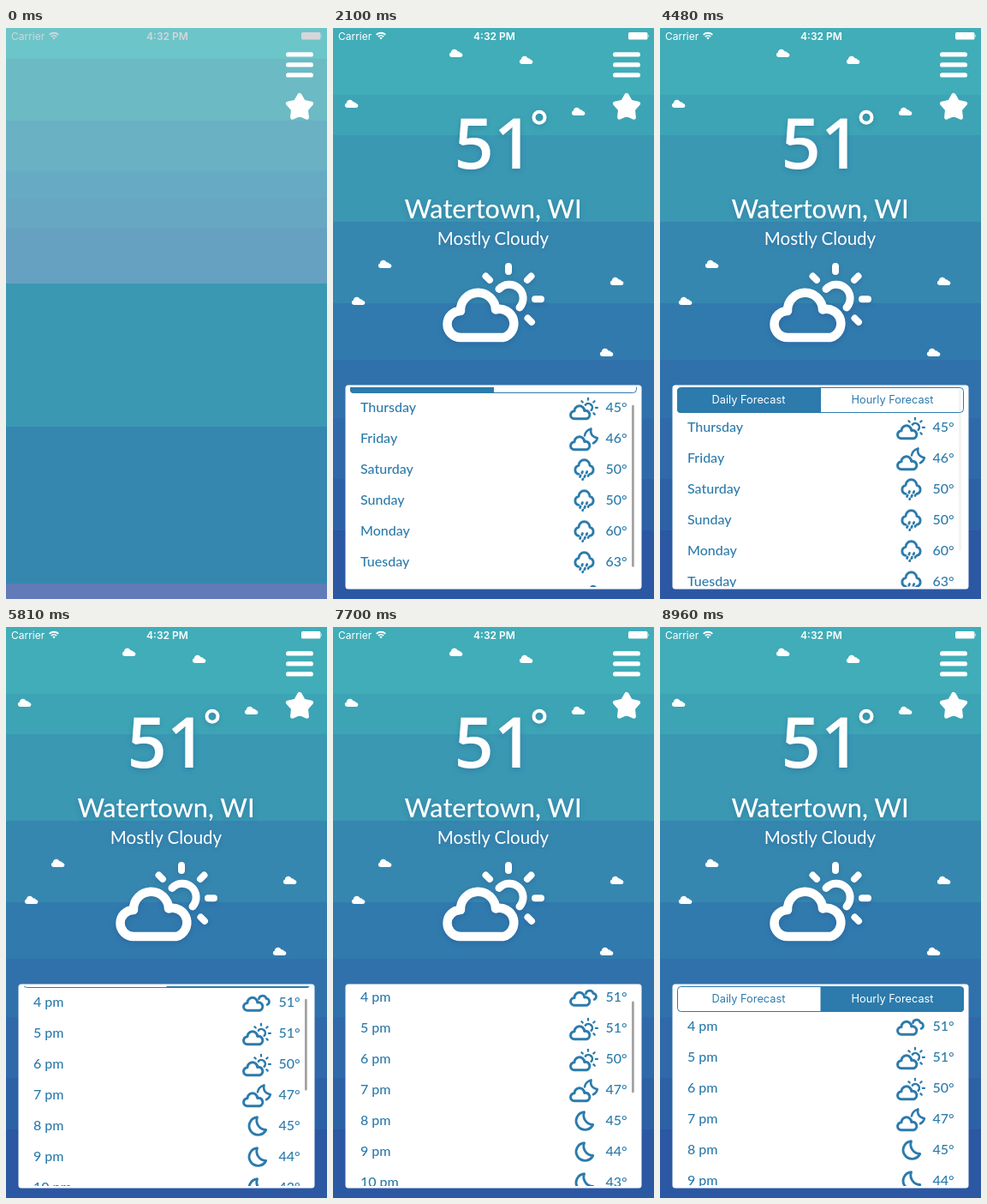
Write an HTML page that moves like this. It is 375 by 666 pixels and loops after 9030 ms.

```html
<!DOCTYPE html>
<html lang="en">
<head>
<meta charset="utf-8">
<title>Weather</title>
<style>
  html, body { margin: 0; width: 100%; height: 100%; overflow: hidden; background: #3a98b3; }
  svg { display: block; width: 375px; height: 666px; }
  .ui { font-family: Inter, Roboto, sans-serif; }
  .copy { font-family: Lato, "Open Sans", sans-serif; }
  .line { fill: none; stroke: currentColor; stroke-linecap: round; stroke-linejoin: round; }
  .shadow { filter: drop-shadow(0 2px 3px rgba(10, 40, 110, .22)); }
  #card { color: #2c7bac; }
  #card text { fill: currentColor; }
  .row text { font-size: 16px; font-weight: 500; }
</style>
</head>
<body>
<svg id="stage" viewBox="0 0 375 666">
  <defs>
    <clipPath id="view"><rect x="20" y="419" width="335" height="233"/></clipPath>
    <path id="puff" d="M-5.5 4a2.8 2.8 0 0 1-.6-5.5A4 4 0 0 1 1.6-2.7 3.4 3.4 0 0 1 5-1.1 2.6 2.6 0 0 1 5.5 4Z"/>
    <path id="cloud" class="line" stroke-width="10.5" d="M149 361A15.5 15.5 0 0 1 149 330A20.5 20.5 0 0 1 190 328.5A16.7 16.7 0 0 1 199 361Z"/>
    <g id="sunny">
      <use href="#cloud"/>
      <path class="line" stroke-width="9" d="M194 304.5A16 16 0 0 1 218 326"/>
      <path class="line" stroke-width="8" d="M205 278V284M178.5 289.5L183 294M231.5 289.5L227 294M236 316.3H243M227.5 338.5L232 343"/>
    </g>
    <g id="night">
      <use href="#cloud"/>
      <path class="line" stroke-width="9" d="M191 304Q194 283 217 276Q210 306 243 314Q238 330 226 335"/>
    </g>
    <g id="cloudy" transform="translate(0 -12)">
      <use href="#cloud"/>
      <path class="line" stroke-width="9.5" d="M196 314A15.5 15.5 0 0 1 226 312A13 13 0 0 1 230 337"/>
    </g>
    <g id="rain">
      <path class="line" stroke-width="2.9" d="M-6.5 5.3A5.1 5.1 0 0 1-6.5-4.7A6.5 6.5 0 0 1 6.5-4.7A5.1 5.1 0 0 1 6.5 5.3"/>
      <path class="line" stroke-width="2.7" d="M-2 2.5l-.7 1.6M3.3 2.5l-.7 1.6M-4.3 7l-.7 1.6M1 7l-.7 1.6M5 6.6l-.4 .9M-1.5 10.8l-.4 .9"/>
    </g>
    <path id="moon" class="line" stroke-width="2.9" d="M0-10.2A10.3 10.3 0 1 0 10.2 4.5A11 11 0 0 1 0-10.2Z"/>
    <path id="wind" class="line" stroke-width="2.8" d="M-14-2.3H10.5A2.8 2.8 0 1 0 8-6.5M-14 2H4.5A3.2 3.2 0 1 1 1.8 7.5"/>
  </defs>

  <g id="sky"></g>
  <g id="haze"></g>

  <g id="status" class="ui">
    <text x="6" y="13.5" font-size="12">Carrier</text>
    <text x="188.5" y="13.5" font-size="12" font-weight="600" text-anchor="middle">4:32 PM</text>
    <path d="M50 7.3a8.6 8.6 0 0 1 12 0l-1.3 1.3a6.7 6.7 0 0 0-9.4 0ZM52.2 9.5a5.4 5.4 0 0 1 7.6 0l-1.3 1.3a3.5 3.5 0 0 0-5 0ZM54.3 11.6a2.4 2.4 0 0 1 3.4 0L56 13.4Z"/>
    <rect x="345" y="5" width="22.5" height="8.5" rx="1.5"/>
    <path d="M368.2 7.5q1.6 1.7 0 3.4Z"/>
  </g>

  <g fill="#fff">
    <rect x="327" y="28.2" width="32" height="5.4" rx="2.7"/>
    <rect x="327" y="40.2" width="32" height="5.4" rx="2.7"/>
    <rect x="327" y="52.2" width="32" height="5.4" rx="2.7"/>
    <polygon id="star" stroke="#fff" stroke-width="5" stroke-linejoin="round"/>
  </g>

  <g id="content" fill="#fff" color="#fff">
    <g id="puffs"></g>
    <g class="shadow">
      <text x="141.5" y="163.5" font-family="'Open Sans', sans-serif" font-size="81" font-weight="600">51</text>
      <circle cx="241" cy="104.3" r="6.5" fill="none" stroke="#fff" stroke-width="4"/>
    </g>
    <g class="copy shadow" text-anchor="middle">
      <text x="187" y="222" font-size="30.5" font-weight="500">Watertown, WI</text>
      <text x="187" y="253" font-size="20.5">Mostly Cloudy</text>
    </g>
    <use href="#sunny" class="shadow"/>
  </g>

  <g id="card">
    <rect x="14.5" y="416.5" width="346" height="238" rx="3.5" fill="#fff"/>
    <g clip-path="url(#view)">
      <g id="scroller">
        <path id="left" d="M188 419.5H24a4 4 0 0 0-4 4V445a4 4 0 0 0 4 4H188Z" fill="currentColor"/>
        <path id="right" d="M187.5 419.5H351a4 4 0 0 1 4 4V445a4 4 0 0 1-4 4H187.5Z" fill="currentColor"/>
        <rect x="20.5" y="419.5" width="334" height="29" rx="4" fill="none" stroke="currentColor"/>
        <g class="ui" font-size="12.8" text-anchor="middle">
          <text id="dailyLabel" x="103.5" y="438">Daily Forecast</text>
          <text id="hourlyLabel" x="271.5" y="438">Hourly Forecast</text>
        </g>
        <g id="daily" class="copy"></g>
        <g id="hourly" class="copy"></g>
      </g>
      <rect id="bar" x="349" width="2.8" rx="1.4" fill="#a3a3a3"/>
    </g>
  </g>
</svg>
<script>
const LOOP = 9030, STEP = 70;
const VIEW = 233, ROW = 36, HEADER = 29;
const $ = id => document.getElementById(id);

// Each band: bottom edge and colour.
const bands = list => {
  let top = 0;
  return list.map(([bottom, color]) => {
    const rect = `<rect y="${top}" width="375" height="${bottom - top}" fill="${color}" shape-rendering="crispEdges"/>`;
    top = bottom;
    return rect;
  }).join('');
};
$('sky').innerHTML = bands([
  [78, '#40adb8'], [125, '#3da4b5'], [226, '#3a98b3'], [321, '#3687b0'], [387, '#317aae'],
  [455, '#3071ab'], [526, '#2f69a9'], [586, '#2d61a6'], [666, '#2b57a3']
]);
$('haze').innerHTML = bands([
  [36, '#6cc5c9'], [108, '#6bbac4'], [166, '#6ab1c4'], [198, '#66abc3'], [233, '#68a7c2'],
  [298, '#66a1c1'], [465, '#3a98b3'], [648, '#3687b0'], [666, '#607bb8']
]);

$('puffs').innerHTML = [[144, 30], [226, 38], [22, 89], [287, 98], [61, 276], [332, 296], [30, 319], [320, 379]]
  .map(([x, y]) => `<use href="#puff" x="${x}" y="${y}"/>`).join('');

$('star').setAttribute('points', Array.from({ length: 10 }, (_, i) => {
  const r = i % 2 ? 7.8 : 14.3, a = i * Math.PI / 5;
  return [343 + r * Math.sin(a), 92.6 - r * Math.cos(a)].map(n => n.toFixed(2));
}).join(' '));

const wide = ['sunny', 'night', 'cloudy'];
const makeRow = ([label, icon, degrees], i) => {
  const place = wide.includes(icon) ? 'translate(293 1) scale(.286) translate(-187.5 -320)' : 'translate(293.5 0)';
  return `<g class="row" transform="translate(0 ${466 + ROW * i})">
    <text x="32" y="5">${label}</text>
    <use href="#${icon}" transform="${place}"/>
    <text x="318.5" y="5">${degrees}°</text></g>`;
};
const days = [
  ['Thursday', 'sunny', 45], ['Friday', 'night', 46], ['Saturday', 'rain', 50], ['Sunday', 'rain', 50],
  ['Monday', 'rain', 60], ['Tuesday', 'rain', 63], ['Wednesday', 'wind', 48]
];
const hourIcons = ['cloudy', 'sunny', 'sunny', 'night'];
const hours = [51, 51, 50, 47, 45, 44, 43, 43, 42, 39, 37, 36, 35].map((degrees, i) =>
  [`${(i + 3) % 12 + 1} ${i < 8 ? 'pm' : 'am'}`, hourIcons[i] || 'moon', degrees]);
$('daily').innerHTML = days.map(makeRow).join('');
$('hourly').innerHTML = hours.map(makeRow).join('');

const clamp = (x, lo = 0, hi = 1) => Math.min(hi, Math.max(lo, x));
const easeOut = x => 1 - (1 - x) ** 3;
const linear = x => x;

// Keys are [time, value, easing towards this key].
const track = (keys, t) => {
  const i = keys.findIndex(key => key[0] > t);
  if (i < 0) return keys[keys.length - 1][1];
  if (i === 0) return keys[0][1];
  const [t0, v0] = keys[i - 1], [t1, v1, ease = linear] = keys[i];
  return v0 + (v1 - v0) * ease((t - t0) / (t1 - t0));
};

const scrollKeys = [
  [2030, 0], [2100, 23], [2170, 48], [2380, 72, easeOut], [2730, 72], [3290, 48, easeOut], [3360, 48],
  [3640, -4], [3990, -32, easeOut], [4130, -32], [4480, 0, easeOut],
  [5740, 0], [6020, 110], [6300, 110], [6580, 275, easeOut], [6720, 275], [6930, 286, easeOut],
  [7140, 286], [7420, 264, easeOut], [7490, 262], [7700, 34], [7800, 0], [8050, -30, easeOut],
  [8120, -30], [8680, 0, easeOut]
];
const barKeys = [
  [2030, 0], [2100, 1], [4200, 1], [4480, .13], [4620, .13], [4690, 0],
  [5740, 0], [5810, 1], [8540, 1], [8960, 0]
];

const mix = (a, b, k) => `rgb(${a.map((v, i) => Math.round(v + (b[i] - v) * k))})`;
const WHITE = [255, 255, 255], BLUE = [44, 123, 172], GREY = [214, 214, 218];

function drawBar(scroll, count, opacity) {
  const height = HEADER + count * ROW, max = height - VIEW;
  const excess = Math.max(0, -scroll, scroll - max);
  const full = 228 * VIEW / height, length = full - excess;
  const top = scroll > max ? 649 - length : 421 + clamp(scroll / max) * (228 - full);
  $('bar').setAttribute('y', top);
  $('bar').setAttribute('height', length);
  $('bar').setAttribute('opacity', opacity);
}

function draw(t) {
  const intro = clamp(t / 490);
  $('haze').setAttribute('opacity', 1 - intro);
  $('content').setAttribute('opacity', intro);
  $('status').setAttribute('fill', mix(GREY, WHITE, intro));

  const enter = clamp((t - 560) / 770);
  $('card').setAttribute('opacity', clamp(enter * 1.4));
  $('card').setAttribute('transform', `translate(0 ${-46 * (1 - easeOut(enter))})`);

  const isHourly = t >= 4690;
  const chosen = clamp((t - 4620) / 280);
  $('daily').setAttribute('display', isHourly ? 'none' : 'inline');
  $('hourly').setAttribute('display', isHourly ? 'inline' : 'none');
  $('left').setAttribute('opacity', 1 - chosen);
  $('right').setAttribute('opacity', chosen);
  $('dailyLabel').style.fill = mix(WHITE, BLUE, chosen);
  $('hourlyLabel').style.fill = mix(BLUE, WHITE, chosen);

  const scroll = Math.round(track(scrollKeys, t));
  $('scroller').setAttribute('transform', `translate(0 ${-scroll})`);
  drawBar(scroll, (isHourly ? hours : days).length, track(barKeys, t));
}

const start = performance.now();
function tick() {
  const t = (performance.now() - start) % LOOP;
  draw(Math.floor(t / STEP) * STEP);
  requestAnimationFrame(tick);
}
tick();
</script>
</body>
</html>
```
